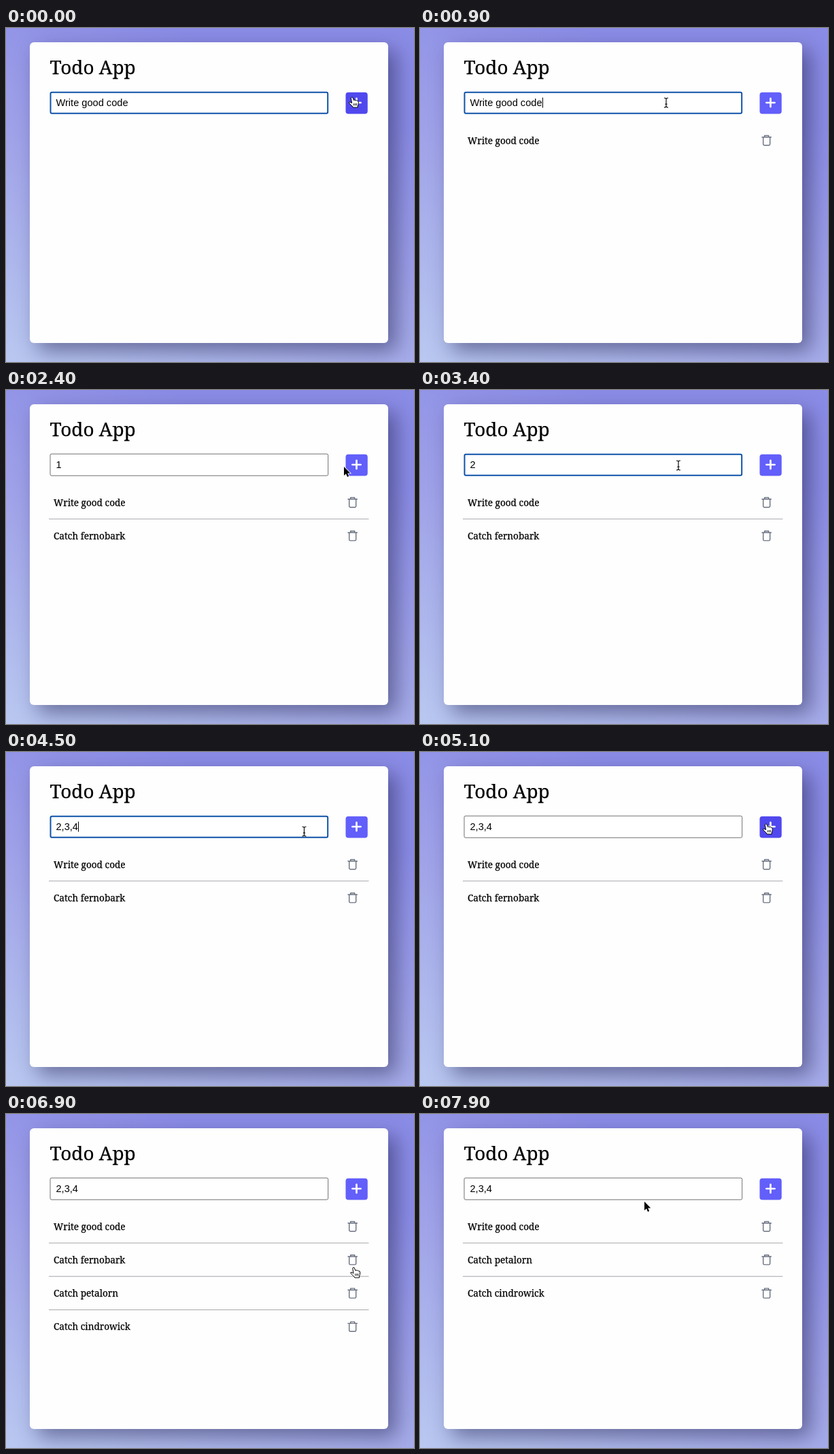
Animation of 600x492 px, one loop 8 s. Source, as an HTML page:

```html
<!DOCTYPE html>
<html lang="en">
<head>
<meta charset="utf-8">
<title>Todo App</title>
<style>
  html, body { margin: 0; width: 100%; height: 100%; overflow: hidden; }
  body { position: relative; background: linear-gradient(22deg, #b9c8f0, #a0a3e8 45%, #8b8ce6 80%); }
  #card {
    position: absolute; left: 35px; top: 21px; width: 526.5px; height: 443px;
    border-radius: 6px; background: #fefefe;
    box-shadow: 12px 12px 30px rgba(30, 30, 75, .5);
  }
  svg { position: absolute; left: 0; top: 0; }
  .serif { font-family: "Noto Serif", serif; stroke: #000; stroke-width: .25; }
  #title { font-size: 27.9px; }
  .item { font-size: 13.6px; }
  #typed { font: 14.6px "Liberation Sans", Arial, sans-serif; }
  .bin { fill: none; stroke: #697080; stroke-width: 1.4; stroke-linecap: round; stroke-linejoin: round; }
</style>
</head>
<body>
<div id="card"></div>
<svg width="600" height="492" viewBox="0 0 600 492">
  <text id="title" class="serif" x="64.5" y="68">Todo App</text>
  <rect id="field" fill="#fff"/>
  <text id="typed" x="73.5" y="115"></text>
  <path id="caret" stroke="#000"/>
  <rect id="add" x="499.5" y="94.7" width="32.3" height="31.8" rx="4"/>
  <path d="M509.4 110H521.6M515.5 103.9V116.1" stroke="#fff" stroke-width="2.7" stroke-linecap="round"/>
  <g id="list"></g>
  <g id="arrow">
    <path d="M0 0V13L3 10.3 5 15 7.2 14 5.2 9.5H9.3Z" stroke="#fff" stroke-width="1.6" paint-order="stroke"/>
  </g>
  <g id="beam" fill="none">
    <path d="M-3-7Q0-7 0-5V5Q0 7-3 7M3-7Q0-7 0-5M3 7Q0 7 0 5M-1.6 2.2H1.6" stroke="#111" stroke-width="1.2"/>
  </g>
  <g id="hand" stroke="#000" stroke-linejoin="round">
    <path d="M-1.6 1.2Q-1-.9.8.3L2.5 4.5Q4 3.2 5 4.6 6.5 3.6 7.3 5.2 9.2 4.8 9.3 7 9.6 10.5 8.2 13V15H1.5Q.5 13-1.8 11.2-4.5 9-4.6 7.6-3.6 6.2-1.6 8L-.4 8.6Z" fill="#fff"/>
    <path d="M2.4 9.2V12.3M4.5 9V12.3M6.5 9V12.3" stroke-width=".9"/>
  </g>
</svg>
<script>
const LOOP = 8000, STEP = 100;
const TRAVEL = 500, PRESS = 200, RESPONSE = 400, KEY = 200, BLINK = 500;
const ROW = 49.2, FIRST = 165.5, BIN_X = 509.7;
const $ = id => document.getElementById(id);

const tasks = ['Write good code', 'Catch fernobark', 'Catch twiglen', 'Catch petalorn', 'Catch cindrowick'];

// Pointer stops; a press there may add or drop tasks.
const stops = [
  { at: 0, x: 509, y: 102, add: [0] },
  { at: 900, x: 362, y: 110 },
  { at: 1700, x: 508, y: 107, add: [1] },
  { at: 2400, x: 497, y: 113 },
  { at: 2900, x: 380, y: 111 },
  { at: 4500, x: 438.5, y: 117 },
  { at: 4800, x: 509, y: 106, add: [2, 3, 4] },
  { at: 5800, x: 369.5, y: 110 },
  { at: 6500, x: 512, y: 252, drop: 2 },
  { at: 7100, x: 511, y: 212, drop: 1 },
  { at: 7900, x: 330, y: 129 }
];

const entries = [
  { at: -LOOP, text: tasks[0] },
  { at: 1300, text: '1' },
  { at: 3400, text: '2,3,4' }
];

const inField = ({ x, y }) => x >= 65 && x <= 474 && y >= 94 && y <= 126.5;
const onAdd = ({ x, y }) => x >= 500 && x <= 532 && y >= 95 && y <= 126.5;
const onBin = ({ x, y }, row) => Math.abs(x - BIN_X) < 10 && Math.abs(y - FIRST - row * ROW) < 14;
const show = (el, on) => el.setAttribute('visibility', on ? 'visible' : 'hidden');

function set(el, attrs) {
  for (const key in attrs) el.setAttribute(key, attrs[key]);
}

function make(name, attrs) {
  const el = document.createElementNS($('list').namespaceURI, name);
  set(el, attrs);
  $('list').append(el);
  return el;
}

const rows = tasks.map((_, i) => {
  const y = FIRST + i * ROW;
  return {
    text: make('text', { class: 'serif item', x: 70, y: y + 5 }),
    bin: make('path', {
      class: 'bin', transform: `translate(${BIN_X} ${y})`,
      d: 'M-6.7-4.7H6.7M-3-4.7V-7H3V-4.7M-5-4.7V5.6Q-5 7.2-3.4 7.2H3.4Q5 7.2 5 5.6V-4.7'
    }),
    line: make('path', { d: `M63 ${y - 24.7}H533.5`, stroke: '#a5a5ab' })
  };
});

function pointer(t) {
  const i = stops.findIndex(s => s.at > t);
  if (i < 0) return stops[stops.length - 1];
  const a = stops[i - 1], b = stops[i];
  const span = Math.min(TRAVEL, b.at - a.at);
  const k = Math.max(0, 1 - (b.at - t) / span), e = k * k * (3 - 2 * k);
  return { x: a.x + (b.x - a.x) * e, y: a.y + (b.y - a.y) * e };
}

// Replays every press up to time t.
function stateAt(t) {
  let focused = true, caret = false, shown = [];
  for (const stop of stops.filter(s => s.at <= t)) {
    const age = t - stop.at;
    caret = inField(stop) && age % (2 * BLINK) < BLINK;
    if (inField(stop)) focused = true;
    else if (age >= PRESS) focused = false;
    if (age >= RESPONSE) {
      shown = shown.concat(stop.add || []).filter(id => id !== stop.drop);
    }
  }
  return { focused, caret, shown };
}

// The field is cleared one key press before each entry.
function textAt(t) {
  const { at, text } = entries.filter(e => e.at - KEY <= t).pop();
  return text.slice(0, Math.max(0, Math.floor((t - at) / KEY) + 1));
}

function drawField(text, focused, caret) {
  const w = focused ? 2 : 1;
  set($('field'), {
    x: 64.5 + w / 2, y: 93.7 + w / 2, width: 409.7 - w, height: 33 - w, rx: 2,
    stroke: focused ? '#0f52a8' : '#707070', 'stroke-width': w
  });
  $('typed').textContent = text;
  const end = 74 + (text ? $('typed').getComputedTextLength() : 0);
  set($('caret'), { d: `M${Math.round(end) + .5} 102.5V117.5` });
  show($('caret'), caret);
}

function drawList(shown) {
  rows.forEach((row, i) => {
    const visible = i < shown.length;
    row.text.textContent = visible ? tasks[shown[i]] : '';
    show(row.bin, visible);
    show(row.line, visible && i);
  });
}

function drawPointer(spot, count) {
  const hover = onAdd(spot);
  const overBin = rows.some((_, i) => i < count && onBin(spot, i));
  const kind = hover || overBin ? 'hand' : inField(spot) ? 'beam' : 'arrow';
  for (const id of ['arrow', 'beam', 'hand']) {
    set($(id), { transform: `translate(${spot.x} ${spot.y})` });
    show($(id), id === kind);
  }
  set($('add'), { fill: hover ? '#5048ee' : '#625ffa' });
}

function draw(now) {
  const t = Math.floor(now % LOOP / STEP) * STEP;
  const { focused, caret, shown } = stateAt(t);
  drawField(textAt(t), focused, caret);
  drawList(shown);
  drawPointer(pointer(t), shown.length);
}

const start = performance.now();

function tick() {
  draw(performance.now() - start);
  requestAnimationFrame(tick);
}

tick();
</script>
</body>
</html>
```
